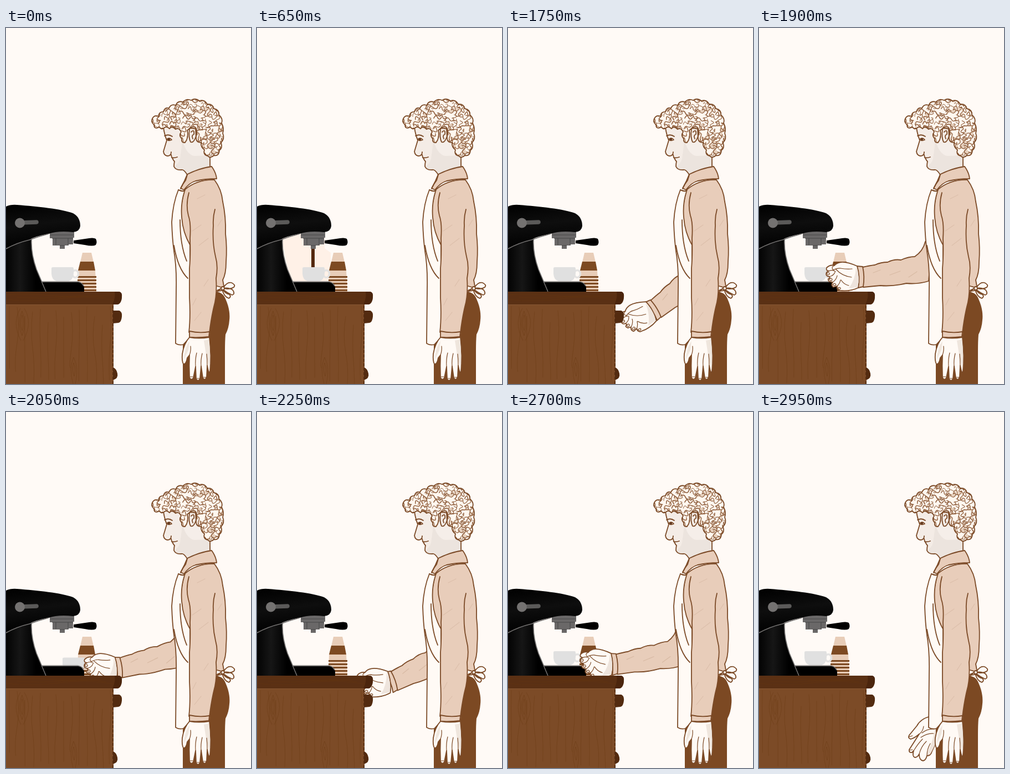
An HTML page for the animation above (3000 ms loop, 442 px wide and 640 px high).

```html
<!DOCTYPE html>
<html lang="en">
<head>
<meta charset="utf-8">
<title>Barista</title>
<style>
html, body { margin: 0; width: 100%; height: 100%; overflow: hidden; background: #fffaf6; }
svg { display: block; width: 442px; height: 640px; }
.ink { stroke: #7b4a27; stroke-width: 1.8; stroke-linecap: round; stroke-linejoin: round; fill: none; }
.thin { stroke-width: 1.2; }
.shirt { fill: #e8cdba; }
.white { fill: #fffaf5; }
.grain { fill: none; stroke: #67390f; stroke-width: 1; opacity: .4; }
</style>
</head>
<body>
<svg viewBox="0 0 442 640">
  <defs>
    <linearGradient id="steel">
      <stop offset="0" stop-color="#030303"/><stop offset=".35" stop-color="#161616"/><stop offset=".75" stop-color="#000"/>
    </linearGradient>
    <linearGradient id="hood" x2=".2" y2="1">
      <stop offset="0" stop-color="#000"/><stop offset=".5" stop-color="#0e0e0e"/><stop offset="1" stop-color="#000"/>
    </linearGradient>
    <clipPath id="hairClip"><use href="#hair"/></clipPath>
  </defs>

  <g id="pour">
    <path fill="#fff1e7" d="M44 378L80 370H122V396L133 404V456H60Z"/>
    <rect id="stream" x="98" y="394" width="6" fill="#54290f"/>
  </g>

  <g id="stack">
    <path fill="#e8cdb8" d="M138 404H154L158 421H134Z"/>
    <path fill="#e8cdb8" d="M130 436H161L163 474H129Z"/>
    <path fill="#7d4a22" d="M134 420H158L161 436H130Z"/>
  </g>

  <g id="cup">
    <ellipse cx="125" cy="442" rx="5.5" ry="6.5" fill="none" stroke="#e4e3e2" stroke-width="3.5"/>
    <path fill="#e0e0e0" d="M82 432Q82 430 85 430H120Q122 430 122 433V441Q121 453 113 455H91Q83 453 82 442Z"/>
  </g>

  <g id="machine">
    <path fill="#6a6868" d="M79 366H123V377H121V389H113V391H106V397H97V391H84V378H79Z"/>
    <path stroke="#474646" fill="none" d="M80 372H122M83 378H121M90 378V390M112 378V390M97 391H106"/>
    <path d="M122 382L143 379Q158 376 162 379Q165 385 162 390Q157 393 142 390L122 387Z"/>
    <path fill="url(#steel)" d="M0 374L46 379C45 400 50 420 55 434L72 474H0Z"/>
    <path d="M60 457H130Q139 457 141 466V474H60Z"/>
    <path fill="url(#hood)" d="M0 321Q8 317 20 318C58 321 99 325 121 333Q134 340 134 356Q133 366 121 367Q94 364 77 370Q50 375 42 381Q22 385 0 397Z"/>
    <path fill="none" stroke="#716f6e" stroke-width="1.6" d="M0 397Q20 386 42 381Q58 375 77 370M46 380C45 400 50 420 55 434L72 474M65 456H129Q137 457 140 464"/>
    <path stroke="#5b5a59" stroke-width="7.5" stroke-linecap="round" d="M27 350L55 349"/>
    <circle cx="25" cy="350.500" r="9" fill="#747271"/>
  </g>

  <g id="farArm">
    <g id="forearm">
      <path class="ink shirt" d="M187 430Q200 427 209 426Q220 421 232 421Q244 415 256 417Q270 411 281 411Q296 401 300 384L312 384L306 455Q286 461 266 459Q240 465 219 463L188 466Z"/>
      <path class="ink thin" opacity=".15" d="M206 440L219 435M236 444L255 437M270 448L285 438"/>
      <path class="ink shirt" d="M176 428L187 429Q191 447 188 465L179 467Q182 448 176 428Z"/>
    </g>
    <g id="grip">
      <path class="ink white" d="M177 428C168 424 158 420 148 421Q140 422 136 427Q128 425 122 431Q120 436 126 437L122 439Q119 446 127 447L128 450Q122 451 127 456L133 457Q129 462 134 466L141 464Q139 471 146 472Q164 474 179 467Q183 447 177 428Z"/>
      <path fill="#eee4dc" d="M162 468Q174 452 175 430Q183 449 178 466Z"/>
      <path class="ink thin" d="M136 427Q129 430 134 435Q142 431 148 432M126 437Q133 434 138 438M127 447Q135 445 137 439M133 457Q140 452 141 445M141 464Q146 459 147 453M139 434Q150 446 167 448M147 432Q158 434 168 433M148 453Q153 461 162 463"/>
      <path class="ink thin" fill="#efd8ca" d="M122 440q1 5 5 3q2-4-5-3M127 451q1 5 5 2q0-5-5-2M133 461q2 4 6 1q-1-5-6-1M142 467q1 4 5 2q1-4-5-2"/>
    </g>
    <g id="open">
      <path class="ink white" d="M309 547Q291 552 285 564L271 581Q268 587 274 588Q281 586 289 579L271 607Q270 613 276 612L279 609Q276 619 281 621Q286 621 289 615Q289 626 296 627Q301 626 303 618Q310 618 312 610L324 584L334 566Z"/>
      <path fill="#eee3da" d="M302 616Q316 590 318 563L329 568Q316 605 308 616Z"/>
      <path class="ink thin" d="M289 579Q296 574 297 565M279 609Q287 596 295 588M289 615Q292 602 302 592M303 618Q303 606 309 596M294 577Q304 569 316 570M292 585Q304 577 315 578M271 584L277 582M272 608L277 607"/>
    </g>
  </g>

  <g id="counter">
    <path fill="#7c4b27" d="M0 496H194V640H0Z"/>
    <g id="grain"></g>
    <path class="grain" d="M29 509Q19 531 29 553Q38 531 29 509M29 516Q24 532 29 544Q33 530 29 516M26 504Q10 530 27 562M33 504Q49 530 31 562M122 592Q113 611 121 640M122 592Q132 611 125 640M122 602Q118 615 123 626Q127 614 122 602"/>
    <path stroke="#4e280e" stroke-width="1.5" stroke-dasharray="5 3" d="M193 499V640"/>
    <path fill="#532b10" d="M193 508H204Q210 510 209 519Q208 529 203 530L193 531ZM193 610Q199 612 201 621Q203 630 193 633Z"/>
    <path fill="#5a3014" d="M0 474H204Q210 475 209 484Q208 496 201 497H0Z"/>
    <path fill="#4b250d" d="M196 474H204Q210 475 209 484Q208 496 201 497H192Q198 485 196 474Z"/>
    <path class="grain" d="M0 480Q40 476 80 481T194 479M0 488Q50 494 95 487T195 489M20 484Q70 487 110 483T180 485"/>
    <path stroke="#8f603d" opacity=".6" d="M0 497.500H192"/>
  </g>

  <g id="man">
    <path fill="#7c4923" d="M376 474Q391 474 396 487Q405 507 403 525Q402 540 396 551Q395 562 395 580V640H319V560H366Z"/>
    <path class="ink shirt" d="M322 291Q345 272 376 273Q389 290 391 312Q397 340 396 370Q399 395 397 421Q397 442 391 453L393 464L380 475L331 480L316 400Q309 340 322 291Z"/>
    <path class="ink white" d="M311 291Q301 315 299 349Q300 380 303 401Q308 430 307 470L306 567Q312 571 320 569L332 556V390Q319 368 317 340Q315 315 322 294Z"/>
    <path class="ink" d="M303 391Q310 433 328 450M314 345Q314 390 326 419"/>
    <path class="shirt" d="M328 299Q325 318 329 337Q334 351 332 378Q333 409 331 432L331 485Q333 520 330 547L367 548Q370 522 375 501Q381 481 379 450Q383 428 378 411Q372 386 374 355Q373 338 376 326L374 288L342 280Z"/>
    <path class="ink" d="M330 296Q324 318 329 337Q334 351 332 378Q333 409 331 432L331 485Q333 520 330 547M367 548Q370 522 375 501Q381 481 379 450Q383 428 378 411Q372 386 374 355Q373 340 377 326"/>
    <path class="ink thin" opacity=".1" d="M336 365L352 354M348 391L365 378M340 526L352 511M337 498L343 486M357 464L365 452M382 356L389 345M345 307L359 300"/>
    <path class="ink shirt" d="M331 545Q349 549 367 546L366 555Q348 557 331 556Z"/>

    <path class="ink white" d="M381 464L391 467L380 472M392 467Q399 456 407 458Q415 462 411 466Q403 471 392 468Q402 466 409 471Q414 478 408 480Q399 476 391 470Q395 477 403 479Q407 483 402 486Q393 483 390 470"/>
    <circle cx="391" cy="468" r="3" class="ink white"/>
    <path class="ink" stroke-width="3" d="M382 473L389 472"/>

    <path class="ink white" d="M331 556Q321 567 318 586Q317 599 320 604Q325 605 327 593L331 588Q330 607 331 628Q334 635 338 629L342 609L343 631Q347 637 350 630L352 608L355 629Q359 635 362 627L363 607Q366 624 368 617Q371 592 367 556Q348 559 331 556Z"/>
    <path fill="#eadfd6" opacity=".75" d="M357 562L366 560Q370 591 367 613L361 587ZM331 563Q322 575 321 596L329 579Z"/>
    <path class="ink thin" d="M342 609Q341 596 344 584M352 608Q351 597 354 585M363 607Q363 595 362 586M331 588Q334 580 333 572M332 627h5M344 630h5M356 628h5"/>

    <path fill="#f4ece6" d="M284 178L290 202L284 222Q286 230 298 228L299 234L302 239Q302 242 304 244Q302 252 308 254Q315 257 320 253L327 264L370 249L367 215L350 168L300 168Z"/>
    <path fill="#ece4de" d="M318 205L314 235Q311 246 302 249Q309 258 320 253L327 264L369 249V232L343 207Z"/>
    <path fill="#f5eee9" d="M319 204Q326 228 340 230L368 229L345 190Z"/>
    <path class="ink" d="M284 179Q286 192 290 202L284 222Q285 229 291 230Q298 230 298 223M298 228L299 233Q304 234 309 232M300 234Q302 238 304 240Q303 244 303 249Q306 256 317 255Q321 254 327 264M368 233V248"/>
    <path class="ink" d="M286 194Q293 190 300 195M290 200Q295 196 299 201Q293 204 290 200"/>
    <circle cx="294" cy="200" r="2" fill="#5d3218"/>

    <path class="ink shirt" d="M327 263Q349 252 371 249Q379 260 380 271Q359 271 342 275Q331 278 321 291L315 288Q322 276 327 263Z"/>
    <path class="ink" d="M327 264L324 274Q319 280 315 289M311 291Q317 295 323 292"/>

    <g clip-path="url(#hairClip)">
      <path id="hair" fill="#fff7ef" d="M286 179Q280 184 277 178Q267 183 267 174Q260 168 265 161Q269 156 275 159Q276 150 284 151Q286 142 294 144Q298 136 306 139Q310 130 319 133Q326 126 334 130Q342 125 349 131Q358 128 363 137Q373 136 375 145Q385 147 384 156Q392 163 389 171Q394 181 391 189Q395 199 388 206Q391 216 385 220Q384 231 375 229Q369 235 364 230Q355 228 358 219Q351 214 352 206Q343 206 343 198L342 181L332 180L327 184Q330 197 323 206Q316 207 317 199Q311 193 316 187Q312 178 306 182Q299 175 295 181Q290 176 286 179Z"/>
      <g id="curls"></g>
    </g>
    <use href="#hair" class="ink" style="fill-opacity:0"/>
    <path class="ink" fill="#f1e5dc" d="M331 181Q338 174 343 180Q346 188 342 197Q338 207 333 205Q329 198 331 181ZM334 187Q340 181 339 191Q334 193 337 199"/>
  </g>
</svg>

<script>
const $ = id => document.getElementById(id);
const add = (id, markup) => $(id).insertAdjacentHTML('beforeend', markup);

let seed = 11;
const rand = (a, b) => {
  seed = seed * 16807 % 2147483647;
  return a + (b - a) * seed / 2147483647;
};

// Stacked cup rims, wood grain and hair
for (let y = 446; y < 474; y += 6)
  add('stack', `<rect x="129" y="${y}" width="34" height="3" fill="#7d4a22"/>`);

for (let x = 6; x < 190; x += 14) {
  const top = rand(500, 535), bend = rand(-7, 7);
  add('grain', `<path class="grain" d="M${x} ${top}q${bend} 35 0 65t${-bend / 2} ${rand(35, 75)}"/>`);
}

// Wavy strands that flow around the crown, some shaded
for (let y = 130; y < 238; y += 8)
  for (let x = 262; x < 396; x += 12) {
    const turn = Math.atan2(y - 190, x - 322) * 180 / Math.PI + 90 + rand(-50, 50);
    const w = rand(5, 9), h = rand(4, 8);
    const fill = rand(0, 1) < .3 ? '#e6d0bd' : '#fff8f0';
    add('curls', `<path class="ink" style="stroke:#8f5f3e;stroke-width:${rand(.9, 1.7)};fill:${fill}"
      transform="translate(${x + rand(-4, 4)} ${y + rand(-3, 3)}) rotate(${turn})"
      d="M${-w} 2Q${-w / 2} ${-h} 0 0T${w} 0Q${w + 2} ${-h} ${w - 3} ${-h / 2}"/>`);
  }

// time, wrist x, wrist y, forearm angle, hand angle
const rest = [356, 548, -80, -80], low = [322, 556, -55, -55];
const near = [197, 458, -5, 3], reach = [180, 446, 0, 0], back = [240, 484, -18, -4];
const keys = [
  [0, ...rest], [1600, ...rest], [1650, ...low], [1850, ...near], [1900, ...reach],
  [1950, ...reach], [2250, ...back], [2500, 188, 455, -3.5, 3], [2600, ...reach],
  [2650, ...reach], [2750, ...near], [2950, ...low], [3000, ...rest]
];

function pose(t) {
  const i = keys.findIndex(k => k[0] > t);
  const a = keys[i - 1], b = keys[i], p = (t - a[0]) / (b[0] - a[0]);
  return a.map((v, n) => v + (b[n] - v) * p).slice(1);
}

const place = (id, x, y, angle, px, py) =>
  $(id).setAttribute('transform', `translate(${x - px} ${y - py}) rotate(${angle} ${px} ${py})`);
const show = (id, on) => $(id).style.display = on ? '' : 'none';

function draw(t) {
  const pouring = t >= 450 && t < 1600;
  show('pour', pouring);
  $('stream').setAttribute('height', Math.min(1, (t - 400) / 150) * 37 * pouring);

  const [x, y, arm, hand] = pose(t);
  const hanging = y > 540;
  place('forearm', x, y, arm, 180, 446);
  place('grip', x, y, hand, 180, 446);
  place('open', x, y, hand + 55, 322, 556);
  show('forearm', !hanging);
  show('grip', !hanging);
  show('open', hanging);

  // The cup sinks behind the counter as the arm pulls away
  const held = t > 1950 && t < 2600, dx = held ? x - 180 : 0;
  $('cup').setAttribute('transform', `translate(${dx} ${46 * (dx / 58) ** 1.3})`);
}

function tick(now) {
  draw(Math.floor(now % 3000 / 50) * 50);
  requestAnimationFrame(tick);
}
requestAnimationFrame(tick);
</script>
</body>
</html>
```
